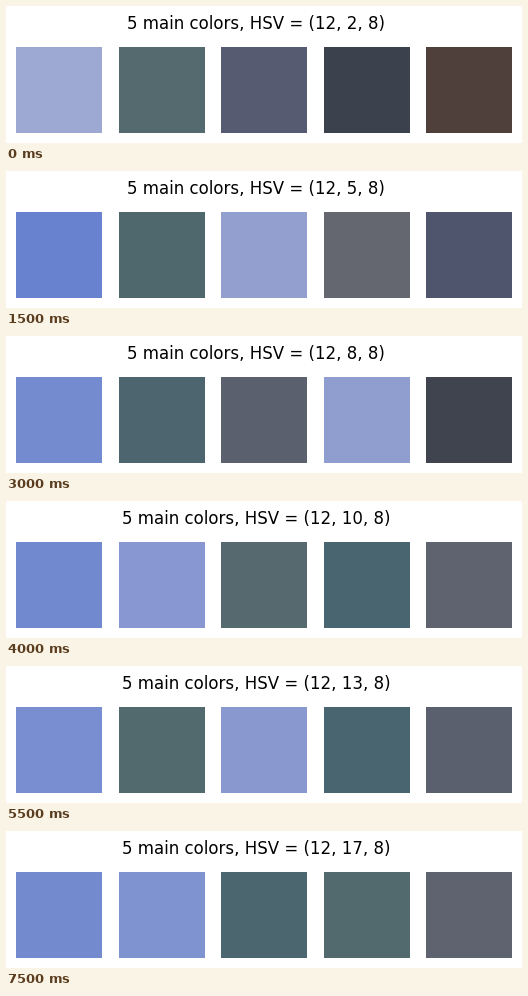
These frames come from a looping animation (516 by 137 pixels, 8 s). A matplotlib script:

```python
import matplotlib.pyplot as plt
from matplotlib.animation import FuncAnimation
from matplotlib.patches import Rectangle

W, H, DPI = 516, 137, 100
SIZE, TOP = 86, 41
PITCH = 496 / 5.8 * 1.2  # square plus a 20 % gap
FIRST_S = 2

# Main colors found for each saturation bin count, largest cluster first
PALETTES = [row.split() for row in """
9da9d3 546a6f 565b71 3c414e 4f403b
8a9ed2 50696e 5a5f73 3c414e 4f403b
7891d0 4f686e 9aa7d1 3f4450 4f556d
6882cf 4e686e 93a0cf 656770 4f556d
738bcf 8f9dcf 4d666e 5f6370 444854
738bcf 4d656e 8f9dcf 5f6370 444854
748bcf 4d656e 5b606f 8f9dcf 40444e
748bcf 4d656e 8a99d1 5b606f 40444e
718acf 8897d2 55696e 49656f 5f636f
738bcf 4e686e 8999d0 5c616f 3e414e
748bcf 8999d0 4e686e 5c616f 3e414e
798ed0 52696e 8999d0 49656f 5b606f
768dd0 8797d0 52696e 49656f 5b606f
748bcf 4e686e 8595d1 5c616f 3d404e
748bcf 8294d0 52696e 4b666f 5b606f
738bce 7f93d0 4c666f 52696e 5f626f
""".strip().splitlines()]

fig = plt.figure(figsize=(W / DPI, H / DPI), dpi=DPI, facecolor="white")
ax = fig.add_axes([0, 0, 1, 1])
ax.set(xlim=(0, W), ylim=(H, 0))
ax.axis("off")

squares = [
    ax.add_patch(Rectangle((round(10 + i * PITCH), TOP), SIZE, SIZE,
                           linewidth=0, antialiased=False))
    for i in range(5)
]
title = ax.text(250, 23, "", fontsize=12, family="DejaVu Sans",
                ha="center", va="baseline", color="black")


def update(step):
    title.set_text(f"5 main colors, HSV = (12, {FIRST_S + step}, 8)")
    for square, color in zip(squares, PALETTES[step]):
        square.set_facecolor("#" + color)
    return [title, *squares]


anim = FuncAnimation(fig, update, frames=len(PALETTES), interval=500,
                     repeat=True, repeat_delay=0, blit=False)
plt.show()
```
